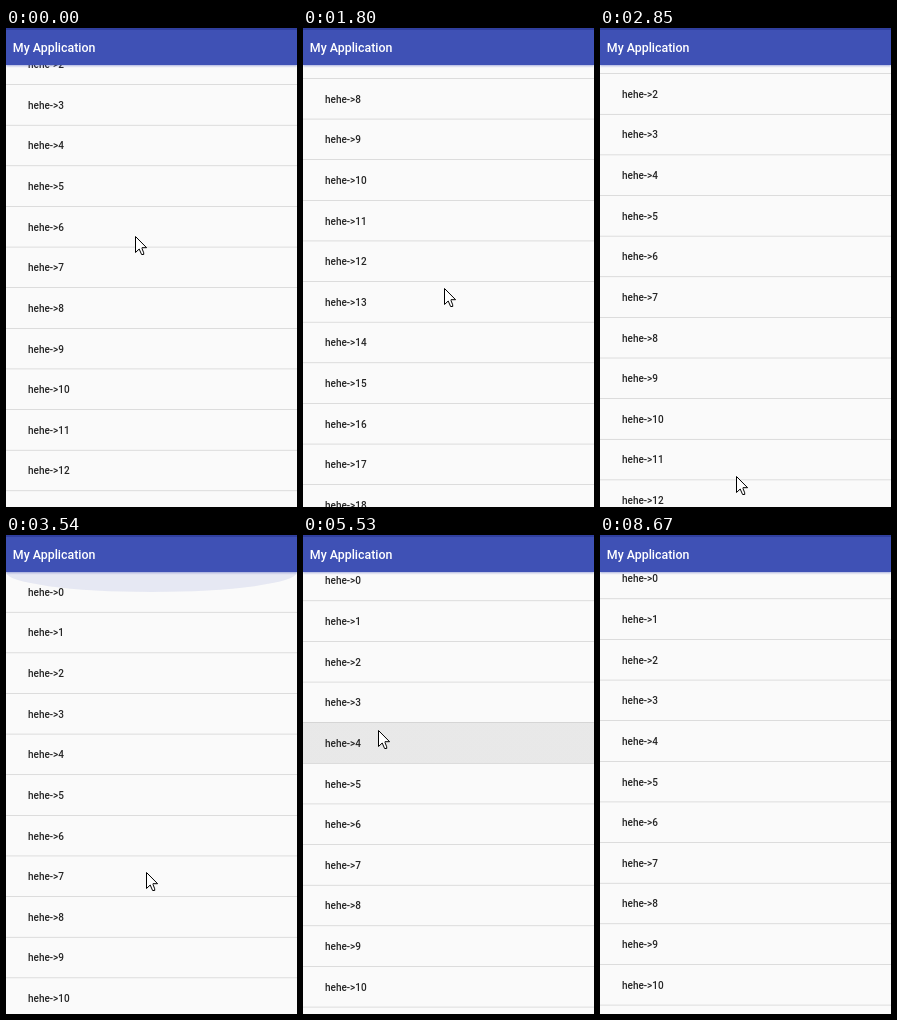
Write an HTML page that moves like this. It is 291 px wide and 479 px high and loops after 9.73 s.

```html
<!DOCTYPE html>
<html lang="en">
<head>
<meta charset="utf-8">
<title>List scrolling</title>
<style>
  html, body { margin: 0; width: 100%; height: 100%; overflow: hidden; }
  body { position: relative; background: #fafafa; font-family: Roboto, sans-serif; }
  header {
    position: absolute; inset: 0 0 auto; height: 37px; box-sizing: border-box;
    padding-left: 6.8px; border-top: 2px solid #303f9f; background: #3f51b5;
    color: #fff; font-size: 12.4px; font-weight: 500; line-height: 36px; white-space: pre;
    box-shadow: 0 1px 2px rgba(63, 81, 181, .45);
  }
  svg { position: absolute; left: 0; top: 0; overflow: visible; }
  #list text { font-size: 10px; font-weight: 500; fill: #262626; white-space: pre; }
  #list rect { fill: #cacaca; }
  #glow {
    position: absolute; top: 37px; left: 0; width: 100%; height: 20px;
    border-radius: 0 0 50% 50% / 0 0 100% 100%; background: #3f51b5;
  }
  #press { position: absolute; left: 0; width: 100%; }
</style>
</head>
<body>
<div id="press"></div>
<svg id="list" width="291" height="479"><g></g></svg>
<div id="glow"></div>
<header>My Application</header>
<svg id="cursor" width="13" height="20">
  <path d="M.5 .5V16.5L4.2 13L6.6 18.5H8.7V16.8L7 12.5V11.7H11.6Z" fill="#fff" stroke="#000"/>
</svg>
<script>
const LOOP = 9730, STEP = 150, CURSOR_GONE = 8670;
const PITCH = 40.625, ROWS = 24, PRESSED_ROW = 4, TOP = -45;

const clamp = v => Math.max(0, Math.min(1, v));
const progress = (t, start, end) => clamp((t - start) / (end - start));
const easeInOut = u => u * u * (3 - 2 * u);
const easeOut = u => 1 - (1 - u) ** 3;

// A fling, a long drag back to the top, then small nudges
const gestures = [
  { start: 0, end: 1170, by: -277, ease: easeOut },
  { start: 1172, end: 3504, by: 379.5, ease: easeInOut },
  { start: 3960, end: 4200, by: -3, ease: easeInOut },
  { start: 4260, end: 5280, by: -9, ease: easeInOut },
  { start: 5530, end: 5800, by: -2, ease: easeInOut }
];
const scrollAt = t => gestures.reduce(
  (y, g) => y + g.by * g.ease(progress(t, g.start, g.end)), TOP);

// Places the pointer visits: time, x, y
const stops = [
  [0, 129, 208], [1170, 136, 190], [1800, 141, 260], [2850, 136, 448], [3960, 143, 250],
  [4200, 143, 248], [5400, 75, 195], [5800, 75, 193], [6500, 236, 192], [7050, 142, 193],
  [7500, 25, 195], [8010, 181, 202], [8640, 27, 442]
];
function pointerAt(t) {
  const next = stops.findIndex(stop => stop[0] > t);
  if (next < 0) return stops.at(-1).slice(1);
  const [start, ...a] = stops[next - 1];
  const [end, ...b] = stops[next];
  const u = easeInOut(progress(t, start, end));
  return a.map((v, i) => Math.round(v + (b[i] - v) * u));
}

const presses = [
  { start: 5000, end: 5600, x: 75 },
  { start: 6590, end: 7150, x: 236 }
];
const FADE = 350, GROWTH = .296;
function ripple(t) {
  const press = presses.find(p => t >= p.start && t < p.end + FADE);
  if (!press) return 'none';
  const strength = 1 - progress(t, press.end, press.end + FADE);
  const shade = alpha => `rgba(0,0,0,${alpha * strength})`;
  const radius = (t - press.start) * GROWTH * (press.x < 100 ? 2 : 1);
  return `radial-gradient(circle at ${press.x}px 8px, ` +
    `${shade(.072)} ${radius}px, ${shade(.043)} ${radius + 1}px)`;
}

const find = selector => document.querySelector(selector);
const rows = find('#list g'), pressBox = find('#press'), glow = find('#glow'), cursor = find('#cursor');

function add(tag, attributes) {
  const node = document.createElementNS('http://www.w3.org/2000/svg', tag);
  for (const name in attributes) node.setAttribute(name, attributes[name]);
  return rows.appendChild(node);
}
for (let i = 0; i < ROWS; i++) {
  add('text', { x: 22, y: i * PITCH + 3.9 }).textContent = `hehe->${i}`;
  add('rect', { y: i * PITCH + 20, width: '100%', height: .625 });
}
pressBox.style.height = `${PITCH}px`;

function draw(now) {
  const time = now % LOOP;
  const t = Math.floor(time / STEP) * STEP;
  const y = scrollAt(t);
  const [px, py] = pointerAt(t);
  rows.setAttribute('transform', `translate(0 ${y})`);
  pressBox.style.top = `${y + PITCH * (PRESSED_ROW - 1) + 20}px`;
  pressBox.style.backgroundImage = ripple(t);
  glow.style.opacity = .14 * progress(t, 3300, 3500) * (1 - progress(t, 3500, 3960));
  cursor.style.transform = `translate(${px}px, ${py}px)`;
  cursor.style.visibility = time < CURSOR_GONE ? 'visible' : 'hidden';
}

const begin = performance.now();
function frame() {
  draw(performance.now() - begin);
  requestAnimationFrame(frame);
}
frame();
</script>
</body>
</html>
```
